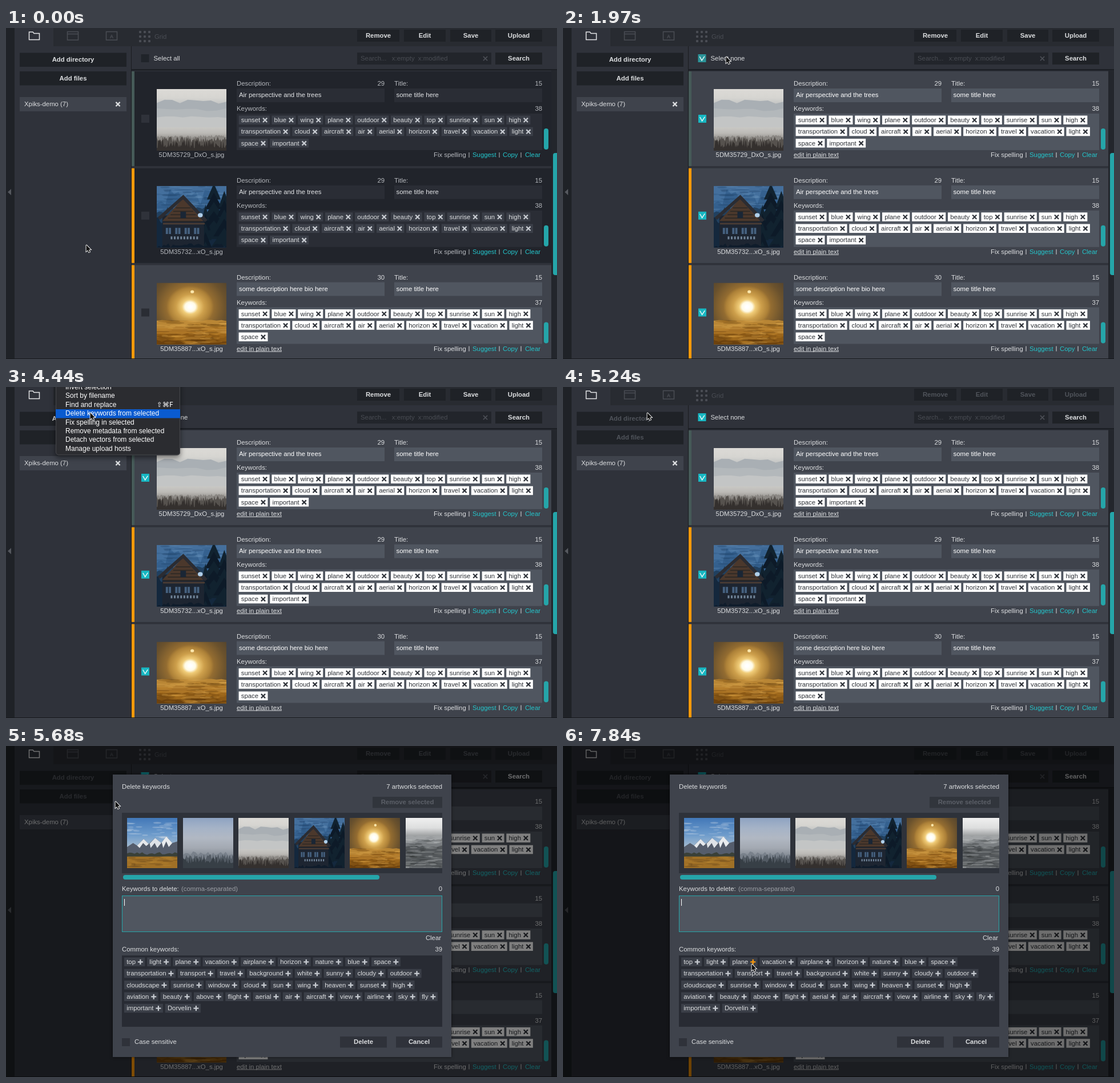
An HTML page with a canvas for the animation above (7990 ms loop, 965 by 580 pixels).

```html
<!DOCTYPE html>
<html>
<head>
<meta charset="utf-8">
<style>
html, body { margin: 0; width: 965px; height: 580px; overflow: hidden; background: #1e2126 }
canvas { display: block }
</style>
</head>
<body>
<canvas id="stage" width="965" height="580"></canvas>
<script>
const LOOP = 7990;
const DARK = '#1f2227', BAR = '#282b31', PANE = '#2f323a', ROW = '#21242b', ACTIVE = '#3f434c';
const FIELD = '#505660', TEAL = '#25a5a9', CHECK = '#17b7c2', LINK = '#24c5cb', PALE = '#dcdee0', DIM = '#4a4d54';
const screen = document.getElementById('stage').getContext('2d');
const layer = Object.assign(document.createElement('canvas'), { width: 965, height: 580 }).getContext('2d');
let c = screen;

// Basic shapes
function rect(x, y, w, h, color, radius = 0) {
  c.fillStyle = color;
  c.beginPath();
  c.roundRect(x, y, w, h, radius);
  c.fill();
}
function poly(points, color) {
  c.fillStyle = color;
  c.beginPath();
  for (let i = 0; i < points.length; i += 2) c.lineTo(points[i], points[i + 1]);
  c.closePath();
  c.fill();
}
function line(points, color, width) {
  c.strokeStyle = color;
  c.lineWidth = width;
  c.beginPath();
  for (let i = 0; i < points.length; i += 2) c[i ? 'lineTo' : 'moveTo'](points[i], points[i + 1]);
  c.stroke();
}
function dot(x, y, r, color) {
  c.fillStyle = color;
  c.beginPath();
  c.arc(x, y, r, 0, 7);
  c.fill();
}
function text(s, x, y, color = PALE, align = 'left', font = '11.35px') {
  c.font = font + ' "Liberation Sans", Arial, sans-serif';
  c.textAlign = align;
  c.fillStyle = color;
  c.fillText(s, x, y + 4);
  return c.measureText(s).width;
}
function button(s, x, y, w, h, color = PALE, bg = DARK) {
  rect(x, y, w, h, bg);
  text(s, x + w / 2, Math.floor(y + h / 2), color, 'center', 'bold 11.35px');
}
function cross(x, y, color, r = 3.6, width = 2.2) {
  line([x - r, y - r, x + r, y + r], color, width);
  line([x - r, y + r, x + r, y - r], color, width);
}
function plus(x, y, color) {
  line([x - 4.5, y, x + 4.5, y], color, 2.2);
  line([x, y - 4.5, x, y + 4.5], color, 2.2);
}
function checkbox(x, y, checked, color) {
  rect(x, y, 14, 14, color);
  if (checked) line([x + 2.8, y + 4, x + 6.6, y + 10.8, x + 11.4, y + 3.6], '#e8f8f8', 1.5);
}
function tags(rows, x0, y0, bg, fg, icon, iconColor, hot) {
  rows.split('/').forEach((row, r) => {
    let x = x0;
    const y = y0 + r * 20.3;
    for (const word of row.split(' ')) {
      c.font = '11.35px "Liberation Sans", Arial, sans-serif';
      const w = c.measureText(word).width;
      rect(x, y - 7.5, w + 20.6, 15.5, bg);
      text(word, x + 4.2, y, fg);
      icon(x + w + 12.6, y + .4, word === hot ? '#ff9a0a' : iconColor);
      x += w + 24.4;
    }
  });
}

// Photo stand-ins, drawn in a unit square
function sky(...stops) {
  const g = c.createLinearGradient(0, 0, 0, 1);
  stops.forEach((s, i) => g.addColorStop(i / (stops.length - 1), s));
  c.fillStyle = g;
  c.fillRect(0, 0, 1, 1);
}
function random(seed) {
  return () => (seed = seed * 16807 % 2147483647) / 2147483647;
}
function ridge(y, height, color, n, seed, bottom = 1) {
  const rnd = random(seed * 7919), p = [0, bottom];
  for (let i = 0; i <= n; i++) p.push(i / n, y - rnd() * height);
  poly([...p, 1, bottom], color);
}
function streaks(n, top, bottom, colors, seed) {
  const rnd = random(seed * 7919);
  c.globalAlpha *= .3;
  for (let i = 0; i < n; i++) {
    const y = top + (bottom - top) * rnd();
    c.fillStyle = colors[i % colors.length];
    c.beginPath();
    c.ellipse(rnd(), y, .04 + .12 * rnd(), .008 + .014 * rnd(), 0, 0, 7);
    c.fill();
  }
  c.globalAlpha /= .3;
}
const photos = {
  peaks() {
    sky('#4278b8', '#6d9bcb', '#b5c4d0', '#c5cdd3');
    streaks(26, .08, .4, ['#dde5ec', '#b7cbe0'], 5);
    poly([0, .58, .12, .5, .2, .55, .33, .42, .43, .52, .56, .4, .68, .5, .78, .37, .9, .5, 1, .47, 1, .78, 0, .78], '#555d6c');
    poly([.33, .42, .43, .52, .38, .56, .32, .5, .25, .6, .2, .55], '#e5e8ec');
    poly([.56, .4, .68, .5, .6, .6, .55, .5, .47, .6, .45, .51], '#dfe3e8');
    poly([.78, .37, .9, .5, .83, .58, .78, .47, .72, .6, .69, .49], '#e8ebee');
    ridge(.74, .06, '#3a4038', 20, 9);
    rect(0, .77, 1, .23, '#a07026');
    streaks(34, .78, .98, ['#5a3d1b', '#bd8a35'], 11);
  },
  fog() {
    sky('#8ea3c2', '#a5b3c7', '#b1b8c3', '#a3a9b2', '#7b828b', '#4d555d');
    ridge(.76, .1, '#79818b', 20, 4);
    ridge(.84, .12, '#535b64', 60, 8);
    ridge(.92, .14, '#373f46', 70, 12);
  },
  mist() {
    sky('#dcdad6', '#d6d5d1', '#b9bcbd', '#c6c8c8', '#cfcfcc', '#bcbab6', '#807d79', '#4a4744');
    ridge(.24, .07, '#a9afb4', 9, 3, .4);
    ridge(.36, .05, '#b3b8bb', 7, 15, .5);
    ridge(.47, .03, '#c3c5c5', 8, 6, .62);
    ridge(.8, .06, '#8b8884', 70, 21);
    ridge(.87, .1, '#56524e', 80, 30);
    ridge(.96, .15, '#34302e', 90, 17);
  },
  cabin() {
    sky('#456f9c', '#41709f', '#2b4d74', '#152739');
    ridge(.34, .3, '#35618f', 16, 19);
    streaks(60, 0, .45, ['#1d3d62', '#6c94bd', '#294f7a'], 8);
    ridge(.52, .2, '#21405f', 26, 7);
    ridge(.62, .2, '#14283d', 40, 41);
    for (const [x, y, w] of [[.82, -.04, .22], [.97, .08, .18], [.7, .3, .12]])
      for (let k = 0; k < 5; k++)
        poly([x, y + k * .15, x + w * (.45 + k * .14), y + .26 + k * .16, x - w * (.45 + k * .14), y + .26 + k * .16], k % 2 ? '#0d1a28' : '#11222f');
    rect(.08, .48, .6, .52, '#1d2531');
    poly([.38, .2, .67, .57, .08, .57], '#4b382c');
    line([.03, .53, .38, .18, .71, .57], '#2b2c32', .05);
    for (let y = .35; y < .58; y += .055) rect(.38 - (y - .2) * .7, y, (y - .2) * 1.4, .014, '#2b2724');
    rect(.34, .42, .08, .1, '#1a2635');
    rect(.09, .6, .6, .025, '#4a3c34');
    for (let i = 0; i < 4; i++) {
      rect(.13 + i * .135, .68, .075, .1, '#46617f');
      rect(.162 + i * .135, .68, .012, .1, '#1a2635');
    }
    for (let i = 0; i < 9; i++) rect(.2 + i * .046, .82, .025, .045, '#6f8296');
    dot(.625, .475, .035, '#afcfea');
    ridge(1, .07, '#0f1c2b', 30, 33);
  },
  sun() {
    const g = c.createRadialGradient(.48, .39, .02, .48, .39, .72);
    [[0, '#fff'], [.08, '#fffbe6'], [.14, '#f0cc78'], [.26, '#cd9f4b'], [.4, '#ad8138'], [.46, '#936c31'], [.7, '#6b522d'], [1, '#4a3e2e']]
      .forEach(([o, s]) => g.addColorStop(o, s));
    c.fillStyle = g;
    c.fillRect(0, 0, 1, 1);
    dot(.51, .145, .025, '#fbe6ab');
    ridge(.63, .03, '#b98635', 14, 23);
    ridge(.74, .03, '#a87226', 14, 2);
    ridge(.85, .04, '#8b5916', 14, 29);
    ridge(.96, .04, '#6d420e', 14, 31);
    streaks(110, .62, 1, ['#d9a54c', '#5f390b', '#b87d27'], 13);
  },
  clouds() {
    sky('#f0f0f0', '#dddede', '#8b8e90', '#4c5053', '#5f6264', '#33373a');
    ridge(.38, .03, '#a1a4a6', 16, 3);
    ridge(.46, .04, '#777b7e', 18, 5);
    ridge(.6, .05, '#54585b', 18, 9);
    streaks(110, .38, 1, ['#c0c3c5', '#2a2d30', '#8f9395'], 51);
  }
};
function photo(name, x, y, w, h) {
  c.save();
  c.translate(x, y);
  c.scale(w, h);
  c.beginPath();
  c.rect(0, 0, 1, 1);
  c.clip();
  photos[name]();
  c.restore();
}

// Main window
const WORDS = 'sunset blue wing plane outdoor beauty top sunrise sun high/transportation cloud aircraft air aerial horizon travel vacation light/space';
const AIR = 'Air perspective and the trees';
const items = [
  { photo: 'mist', file: '5DM35729_DxO_s.jpg', about: AIR, words: WORDS + ' important', count: 38, bar: '#465a58' },
  { photo: 'cabin', file: '5DM35732...xO_s.jpg', about: AIR, words: WORDS + ' important', count: 38, bar: '#ff9a0a' },
  { photo: 'sun', file: '5DM35887...xO_s.jpg', about: 'some description here bio here', words: WORDS, count: 37, bar: '#ff9a0a' }
];
function itemRow(item, i, checked) {
  const on = checked || i === 2, label = on ? PALE : '#b6b9be', field = on ? FIELD : '#2a2d35';
  const value = on ? '#fff' : '#e2e4e6';
  c.save();
  c.translate(0, 169.75 * i);
  rect(220, 76, 735, 166, on ? ACTIVE : ROW);
  rect(220, 76, 5, 166, item.bar);
  checkbox(237, 152, checked, checked ? CHECK : on ? '#2a2d34' : PANE);
  photo(item.photo, 264, 107, 122, 108);
  text(item.file, 325, 222, label, 'center');
  text('Description:', 404, 97, label);
  text(item.about.length, 663, 97, label, 'right');
  text('Title:', 680, 97, label);
  text('15', 939, 97, label, 'right');
  rect(404, 106, 259, 24, field);
  rect(680, 106, 259, 24, field);
  text(item.about, 408, 117, value);
  text('some title here', 683.5, 117, value);
  text('Keywords:', 404, 141, label);
  text(item.count, 939, 141, label, 'right');
  rect(404, 150, 535, 64, field);
  tags(item.words, 407.6, 161, on ? '#fff' : '#3b3f48', on ? '#2c3036' : PALE, cross, on ? '#30343b' : '#c8ccd2');
  rect(942, 176, 8, 37, TEAL, 4);
  if (on) {
    const w = text('edit in plain text', 404, 222, label);
    rect(404, 227, w, 1, label);
  }
  text('Fix spelling', 749, 222, label);
  for (const x of [810.5, 863.5, 901.5]) rect(x, 218, 1, 9, label);
  text('Suggest', 817, 222, LINK);
  text('Copy', 870, 222, LINK);
  text('Clear', 936, 222, LINK, 'right');
  c.restore();
}
function windowView(t) {
  const checked = t >= 1970, disabled = t >= 5230 ? '#50545b' : PALE;
  rect(0, 0, 965, 580, PANE);
  rect(0, 0, 15, 580, DARK);
  poly([9, 282, 9, 293, 3, 287.5], '#55585e');
  rect(83, 0, 882, 32, BAR);
  rect(219, 32, 1, 548, '#1a1c20');

  line([40.5, 20.5, 40.5, 7, 47, 7, 49, 9.5, 58.5, 9.5, 58.5, 20.5, 39.8, 20.5], '#e2e4e6', 1.5);
  for (const x of [107.5, 175.5]) {
    c.strokeStyle = DIM;
    c.lineWidth = 1.5;
    c.strokeRect(x, 6.5, 19, 14.5);
  }
  line([108, 10.5, 126, 10.5], DIM, 1.5);
  text('A', 185, 14, DIM, 'center', 'bold 9px');
  for (let i = 0; i < 9; i++) rect(233 + i % 3 * 8, 5 + Math.floor(i / 3) * 8, 4, 4, DIM, 1);
  text('Grid', 260, 15, DIM);

  button('Remove', 615, 3, 74, 21, disabled);
  button('Edit', 697, 3, 73, 21, disabled);
  button('Save', 778, 3, 72, 21, disabled);
  button('Upload', 857, 3, 82, 21, disabled);
  button('Add directory', 24, 43.5, 187, 24.5, disabled);
  button('Add files', 24, 76, 187, 24.5, disabled);
  rect(24, 121, 187, 25, ACTIVE);
  text('Xpiks-demo (7)', 32, 133);
  cross(196, 133.5, PALE);

  const box = t < 1770 ? '#20242a' : t < 1970 ? '#2a8388' : t < 2640 ? '#2b9499' : CHECK;
  checkbox(236.5, 46, checked, box);
  text(checked ? 'Select none' : 'Select all', 258.5, 53);
  rect(615, 43, 235, 21, '#22252b');
  text('Search...   x:empty  x:modified', 621, 53, DIM);
  cross(839.5, 53.5, DIM, 3.6, 1.8);
  button('Search', 857, 43, 82, 21);

  rect(220, 72, 745, 2.5, '#1c1f24');
  rect(955, 75, 10, 505, '#23262c');
  items.forEach((item, i) => itemRow(item, i, checked));
  rect(958, 219, 10, 214, TEAL, 4);
  rect(0, 579, 965, 1, '#17191d');
}

// Menu hanging down from above the stage
const MENU = ['Invert selection', 'Sort by filename', 'Find and replace', 'Delete keywords from selected', 'Fix spelling in selected',
  'Remove metadata from selected', 'Detach vectors from selected', 'Manage upload hosts'];
function menu(pointerY) {
  c.save();
  c.shadowColor = 'rgba(0,0,0,.5)';
  c.shadowBlur = 10;
  c.shadowOffsetY = 4;
  rect(87, -20, 218, 139.5, '#2b2c30', 5);
  c.restore();
  c.strokeStyle = '#47484c';
  c.lineWidth = 1;
  c.beginPath();
  c.roundRect(87.5, -20, 217, 139, 5);
  c.stroke();
  MENU.forEach((s, i) => {
    const y = -7.2 + 15.4 * i;
    if (pointerY >= y && pointerY < y + 15.4 && pointerY > -7) rect(87, y, 218, 15.4, '#0a5bd0');
    text(s, 104, Math.floor(y + 7.6), '#fff', 'left', '12px');
  });
  c.font = '12px "DejaVu Sans", sans-serif';
  c.textAlign = 'right';
  c.fillText('⇧⌘F', 293, 35);
}

// Dialog
const COMMON = 'top light plane vacation airplane horizon nature blue space/transportation transport travel background white sunny cloudy outdoor'
  + '/cloudscape sunrise window cloud sun wing heaven sunset high/aviation beauty above flight aerial air aircraft view airline sky fly/important Dorvelin';
function dialog(hot) {
  c.save();
  c.shadowColor = 'rgba(0,0,0,.5)';
  c.shadowBlur = 5;
  rect(187, 50, 593, 495, ACTIVE);
  c.restore();
  text('Delete keywords', 203, 71);
  text('7 artworks selected', 764, 71, PALE, 'right');
  button('Remove selected', 642, 89, 122, 19.5, '#5c6068', '#31353c');
  rect(203, 117, 561, 106, '#2e323a');
  c.save();
  c.beginPath();
  c.rect(203, 117, 561, 106);
  c.clip();
  ['peaks', 'fog', 'mist', 'cabin', 'sun', 'clouds'].forEach((name, i) => photo(name, Math.round(212 + i * 97.6), 126, 88, 88));
  c.restore();
  rect(205, 226, 449, 8, TEAL, 4);
  text('Keywords to delete:', 203, 250);
  text('(comma-separated)', 307, 250, '#9a9da3');
  text('0', 764, 250, PALE, 'right');
  rect(203, 262, 561, 64, TEAL);
  rect(204, 263, 559, 62, FIELD);
  rect(207, 268, 1, 12, '#fff');
  text('Clear', 762, 336, PALE, 'right');
  text('Common keywords:', 203, 356);
  text('39', 764, 356, PALE, 'right');
  rect(203, 367, 561, 125, '#282b33');
  tags(COMMON, 207, 378, '#3b3f48', PALE, plus, '#c8ccd2', hot);
  checkbox(203, 512, false, PANE);
  text('Case sensitive', 225, 518);
  button('Delete', 585, 509, 82, 19.5, PALE, PANE);
  button('Cancel', 683, 509, 81, 19.5, PALE, PANE);
}

// Pointer: start, end, steps, target x, target y
const MOVES = [
  [150, 1080, 6, 286, 44], [1410, 1410, 1, 288, 48], [1970, 1970, 1, 285, 50], [2120, 2640, 4, 139, -16],
  [3630, 4110, 4, 147, 82], [4275, 4440, 2, 147, 45], [5680, 5680, 1, 191, 97], [6040, 6300, 2, 201, 119],
  [6600, 7540, 7, 330, 382]
];
function pointerAt(t) {
  let x = 140, y = 380;
  for (const [start, end, steps, tx, ty] of MOVES) {
    if (t < start) break;
    const done = end > start ? Math.min(steps, Math.floor((t - start) / (end - start) * (steps - 1) + 1e-6) + 1) : 1;
    x += (tx - x) * done / steps;
    y += (ty - y) * done / steps;
  }
  return [Math.round(x), Math.round(y)];
}
function pointer(x, y) {
  const shape = [0, 0, 0, 11.5, 2.6, 9.2, 4.6, 13.2, 6.4, 12.4, 4.6, 8.4, 8, 8.2, 0, 0];
  c.save();
  c.translate(x + .5, y);
  line(shape, '#fff', 1.8);
  poly(shape, '#111');
  c.restore();
}

// Darkness of the backdrop and opacity of the dialog
function fade(t) {
  if (t < 5420) return [0, 0];
  if (t < 5680) return [.12, .16];
  return [t < 6040 ? .5 : t < 6300 ? .55 : .57, 1];
}

function draw() {
  const t = performance.now() % LOOP, [px, py] = pointerAt(t), [dark, alpha] = fade(t);
  windowView(t);
  if (t >= 3150 && t < 5030) menu(py);
  if (alpha) {
    rect(0, 0, 965, 580, `rgba(0,0,0,${dark})`);
    c = layer;
    c.clearRect(0, 0, 965, 580);
    dialog(t >= 7840 ? 'plane' : '');
    c = screen;
    c.globalAlpha = alpha;
    c.drawImage(layer.canvas, 0, 0);
    c.globalAlpha = 1;
  }
  pointer(px, py);
  requestAnimationFrame(draw);
}
draw();
</script>
</body>
</html>
```
